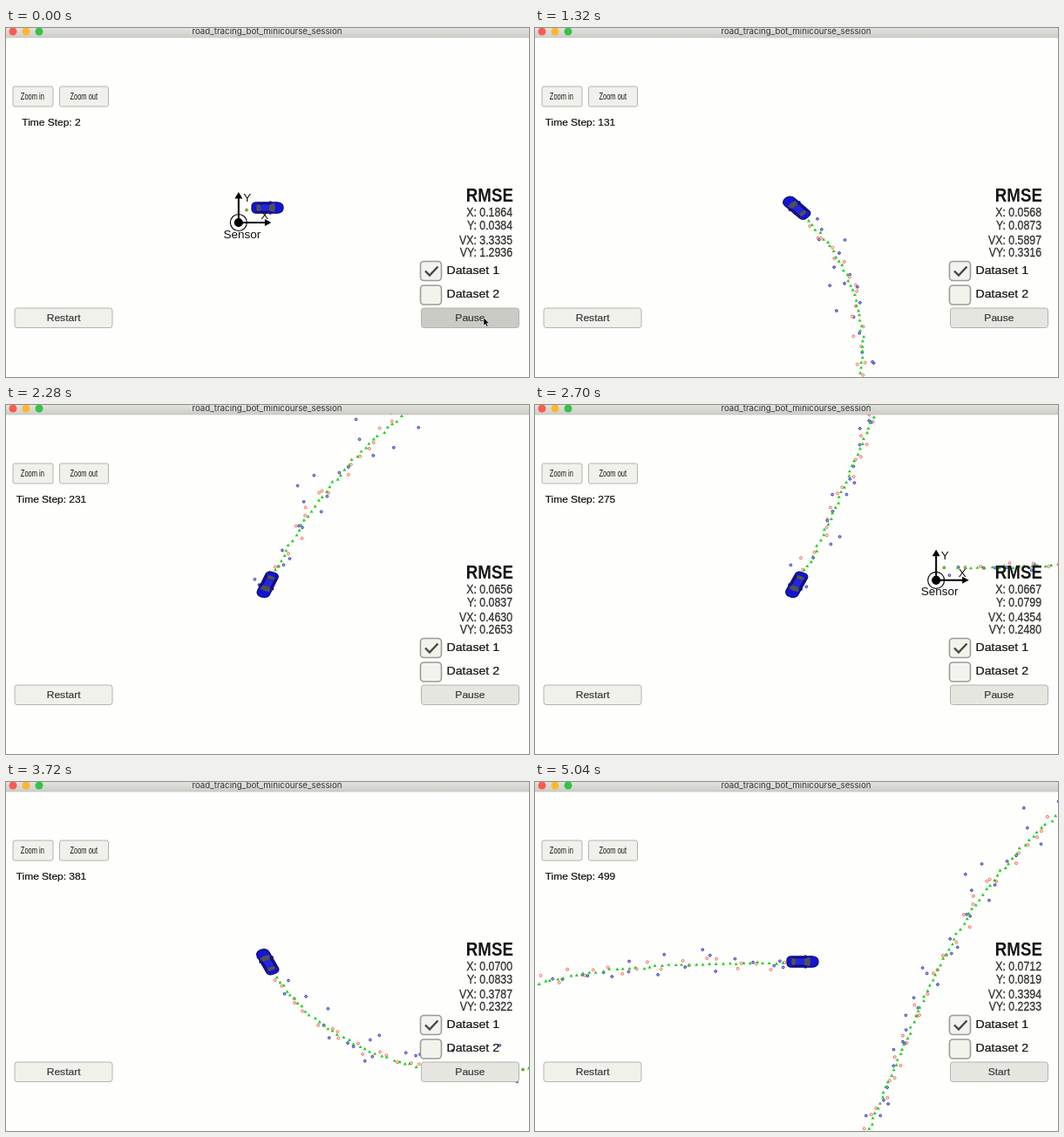
Animation of 600x400 px, one loop 5100 ms. Source, as an HTML page with a canvas:

```html
<!DOCTYPE html>
<html lang="en">
<head>
<meta charset="utf-8">
<title>Tracking simulator</title>
<style>
  html, body { margin: 0; width: 100%; height: 100%; overflow: hidden; background: #fefefc; }
  canvas, svg { position: absolute; left: 0; top: 0; display: block; }
  text { font-family: "Liberation Sans", Arial, sans-serif; fill: #141414; }
  .mid { text-anchor: middle; }
  .btn { fill: #f1f1ec; stroke: #b4b4ae; }
  .run { fill: #e6e6e1; }
  .run.down { fill: #cbcbc6; }
  .label { font-size: 10.5px; fill: #343434; stroke: #343434; stroke-width: .15; }
  .box { fill: #f3f3ee; stroke: #9c9c96; stroke-width: 1.6; }
  .plain { stroke: #141414; stroke-width: .2; }
  .title { font: 9.75px Inter, sans-serif; fill: #343434; }
  .value { font-size: 14.5px; fill: #303030; stroke: #303030; stroke-width: .3; text-anchor: end; }
</style>
</head>
<body>
<canvas id="world" width="600" height="400"></canvas>
<svg width="600" height="400" viewBox="0 0 600 400">
  <defs>
    <linearGradient id="bar" x2="0" y2="1">
      <stop stop-color="#e2e2de"/><stop offset="1" stop-color="#cecec9"/>
    </linearGradient>
  </defs>
  <rect width="600" height="10.5" fill="url(#bar)"/>
  <path d="M0 10.8H600" stroke="#b2b2ad" stroke-width=".8"/>
  <circle cx="8" cy="4" r="4.5" fill="#fc5a50"/>
  <circle cx="23" cy="4" r="4.5" fill="#fdb72c"/>
  <circle cx="38" cy="4" r="4.5" fill="#35c248"/>
  <text class="title mid" x="299.5" y="7.3">road_tracing_bot_minicourse_session</text>

  <rect class="btn" x="8" y="67" width="46" height="23" rx="2"/>
  <rect class="btn" x="61.500" y="67" width="56" height="23" rx="2"/>
  <g transform="scale(.75 1)" font-size="10">
    <text class="mid" x="40.500" y="82.500">Zoom in</text>
    <text class="mid" x="119" y="82.500">Zoom out</text>
  </g>

  <g transform="translate(581 0) scale(.85 1)">
    <text x="1" y="199" font-size="22" font-weight="bold" text-anchor="end">RMSE</text>
    <text class="value" y="216"></text>
    <text class="value" y="231.500"></text>
    <text class="value" y="248"></text>
    <text class="value" y="262.500"></text>
  </g>

  <rect class="box" x="475.500" y="267.500" width="24" height="22" rx="4"/>
  <rect class="box" x="475.500" y="295" width="24" height="22" rx="4"/>
  <path d="M481 278.500L486 283.500L495.500 273.500" fill="none" stroke="#484844" stroke-width="2.4"/>
  <rect class="btn" x="10" y="321" width="112" height="22.500" rx="3"/>
  <rect class="btn run" id="runBox" x="476.500" y="321" width="112" height="22.500" rx="3"/>

  <!-- The window is wider than its layout, so this text is broad -->
  <g transform="scale(1.15 1)">
    <text id="step" class="plain mid" x="45.200" y="112" font-size="10.4"></text>
    <text class="plain" x="439.600" y="282.500" font-size="12.3">Dataset 1</text>
    <text class="plain" x="439.600" y="309.500" font-size="12.3">Dataset 2</text>
    <text class="label mid" x="57.500" y="336.200">Restart</text>
    <text class="label mid" id="run" x="463" y="336.200"></text>
  </g>
  <path id="mouse" d="M548 332v9l2-1.700 1.400 3 1.500-.7-1.400-3h2.700z" fill="#000" stroke="#fff" stroke-width=".5"/>
</svg>
<script>
const LOOP = 5100, TICK = 60, LAST = 499;
const SX = 29.6, SY = 25, CX = 300, CY = 208;
const TAU = Math.PI * 2;
const ctx = document.getElementById('world').getContext('2d');
const byId = id => document.getElementById(id);
const values = [...document.querySelectorAll('.value')];
const names = ['X', 'Y', 'VX', 'VY'];

// time, step, then the four error values
const keys = [
  [0, 2, .1864, .0384, 3.3335, 1.2936],
  [540, 50, .0590, .0918, .9359, .4903],
  [1320, 131, .0568, .0873, .5897, .3316],
  [1860, 186, .0639, .0891, .5019, .2895],
  [2700, 275, .0667, .0799, .4354, .2480],
  [3720, 381, .0700, .0833, .3787, .2322],
  [4920, LAST, .0712, .0819, .3394, .2233]
];

const mix = (a, b, u) => a + (b - a) * u;
const heading = k => .55 * 25 / TAU * (1 - Math.cos(TAU * k / 500));
const speed = k => 5 + .2 * Math.cos(2 * TAU * k / 500);

let seed = 41;
const rand = () => (seed = seed * 16807 % 2147483647) / 2147483647;
const gauss = s => s * Math.sqrt(-2 * Math.log(rand())) * Math.cos(TAU * rand());

// Drive the figure-eight: one point per 0.05 s
const path = [{ x: .6, y: .6 }];
for (let k = 0; k <= LAST; k++) {
  const p = path[k], d = speed(k + .5) * .05, a = heading(k + .5);
  path.push({ x: p.x + d * Math.cos(a), y: p.y + d * Math.sin(a) });
}

// Laser on even steps, radar (range and bearing noise) on odd ones
const sensed = path.map((p, i) => {
  if (i === 0) return { x: .31, y: .58 };
  if (i < 3) return p;
  if (i % 2 === 0) return { x: p.x + gauss(.15), y: p.y + gauss(.15) };
  const r = Math.hypot(p.x, p.y) + gauss(.3);
  const a = Math.atan2(p.y, p.x) + gauss(.03);
  return { x: r * Math.cos(a), y: r * Math.sin(a) };
});
const guess = path.map((p, i) => i ? { x: p.x + gauss(.03), y: p.y + gauss(.03) } : sensed[0]);

function stateAt(t) {
  let i = 0;
  while (i < keys.length - 2 && t >= keys[i + 1][0]) i++;
  const a = keys[i], b = keys[i + 1];
  const u = Math.min(1, (t - a[0]) / (b[0] - a[0]));
  const step = Math.round(mix(a[1], b[1], u));
  const w = (step - a[1]) / (b[1] - a[1]);
  // The summed squared error grows evenly between keys
  const errors = names.map((_, j) =>
    Math.sqrt(mix(a[j + 2] ** 2 * a[1], b[j + 2] ** 2 * b[1], w) / step));
  return { step, errors };
}

function ring(x, y, r, stroke, fill) {
  ctx.beginPath();
  ctx.arc(x, y, r, 0, TAU);
  ctx.fillStyle = fill;
  ctx.fill();
  ctx.strokeStyle = stroke;
  ctx.stroke();
}

function poly(color, ...pts) {
  ctx.beginPath();
  pts.forEach(([x, y]) => ctx.lineTo(x, y));
  ctx.closePath();
  ctx.fillStyle = color;
  ctx.fill();
}

function drawTrail(step, place) {
  ctx.lineWidth = .9;
  for (let i = 0; i <= step; i++) {
    const [x, y] = place(sensed[i]);
    if (i % 2) ring(x, y, 1.4, '#2424b4', '#b4b4e4');
    else ring(x, y, 1.5, '#f4584a', '#fff0e8');
  }
  for (let i = 0; i <= step; i++) {
    const [x, y] = place(guess[i]);
    poly('#22cc22', [x - 2, y + 1.5], [x, y - 1.9], [x + 2, y + 1.5]);
  }
}

function drawCar(x, angle) {
  ctx.save();
  ctx.translate(x, 206);
  ctx.scale(1, SY / SX);
  ctx.rotate(-angle);
  ctx.beginPath();
  ctx.roundRect(-18, -7.5, 36, 15, [5, 6.5, 6.5, 5]);
  ctx.fillStyle = '#1414d4';
  ctx.fill();
  ctx.lineWidth = 1.2;
  ctx.strokeStyle = '#0c0c60';
  ctx.stroke();
  ctx.fillStyle = '#0c0c60';
  ctx.fillRect(2, -9, 2.5, 2);
  ctx.fillRect(2, 7, 2.5, 2);
  ctx.fillRect(-12, -6, 17, 12);
  ctx.fillStyle = '#2424e0';
  ctx.fillRect(-8, -4.5, 10, 9);
  poly('#505058', [2, -4.5], [8, -6], [9, 0], [8, 6], [2, 4.5]);
  poly('#505058', [-8, -4], [-12, -5], [-13, 0], [-12, 5], [-8, 4]);
  ctx.restore();
}

function drawSensor([x, y]) {
  ctx.save();
  ctx.translate(x, y);
  ctx.lineWidth = 1.2;
  ring(0, 0, 9.5, '#111', 'transparent');
  ring(0, 0, 4.5, '#000', '#000');
  ctx.lineWidth = 2;
  ctx.beginPath();
  ctx.moveTo(0, -30);
  ctx.lineTo(0, 0);
  ctx.lineTo(33, 0);
  ctx.stroke();
  poly('#000', [-4.5, -27.5], [0, -35], [4.5, -27.5]);
  poly('#000', [30, -4], [37.5, 0], [30, 4]);
  ctx.fillStyle = '#111';
  ctx.textAlign = 'center';
  ctx.font = '13.5px "Liberation Sans", Arial, sans-serif';
  ctx.fillText('Y', 10, -24);
  ctx.fillText('X', 30, -4);
  ctx.fillText('Sensor', 4, 17.5);
  ctx.restore();
}

function draw(t) {
  const { step, errors } = stateAt(t);
  const done = step >= LAST;
  const cam = path[done ? LAST + 1 : step];
  const place = p => [CX + (p.x - cam.x) * SX, CY - (p.y - cam.y) * SY];

  ctx.fillStyle = '#fefefc';
  ctx.fillRect(0, 0, 600, 400);
  drawTrail(step, place);
  drawCar(done ? CX + 7 : CX, heading(step));
  drawSensor(place({ x: 0, y: 0 }));

  byId('step').textContent = 'Time Step: ' + step;
  values.forEach((el, i) => el.textContent = names[i] + ': ' + errors[i].toFixed(4));
  byId('run').textContent = done ? 'Start' : 'Pause';
  const hover = t < 200;
  byId('runBox').classList.toggle('down', hover);
  byId('mouse').style.display = hover ? '' : 'none';
}

function loop() {
  const t = performance.now() % LOOP;
  draw(Math.floor(t / TICK) * TICK);
  requestAnimationFrame(loop);
}
loop();
</script>
</body>
</html>
```
